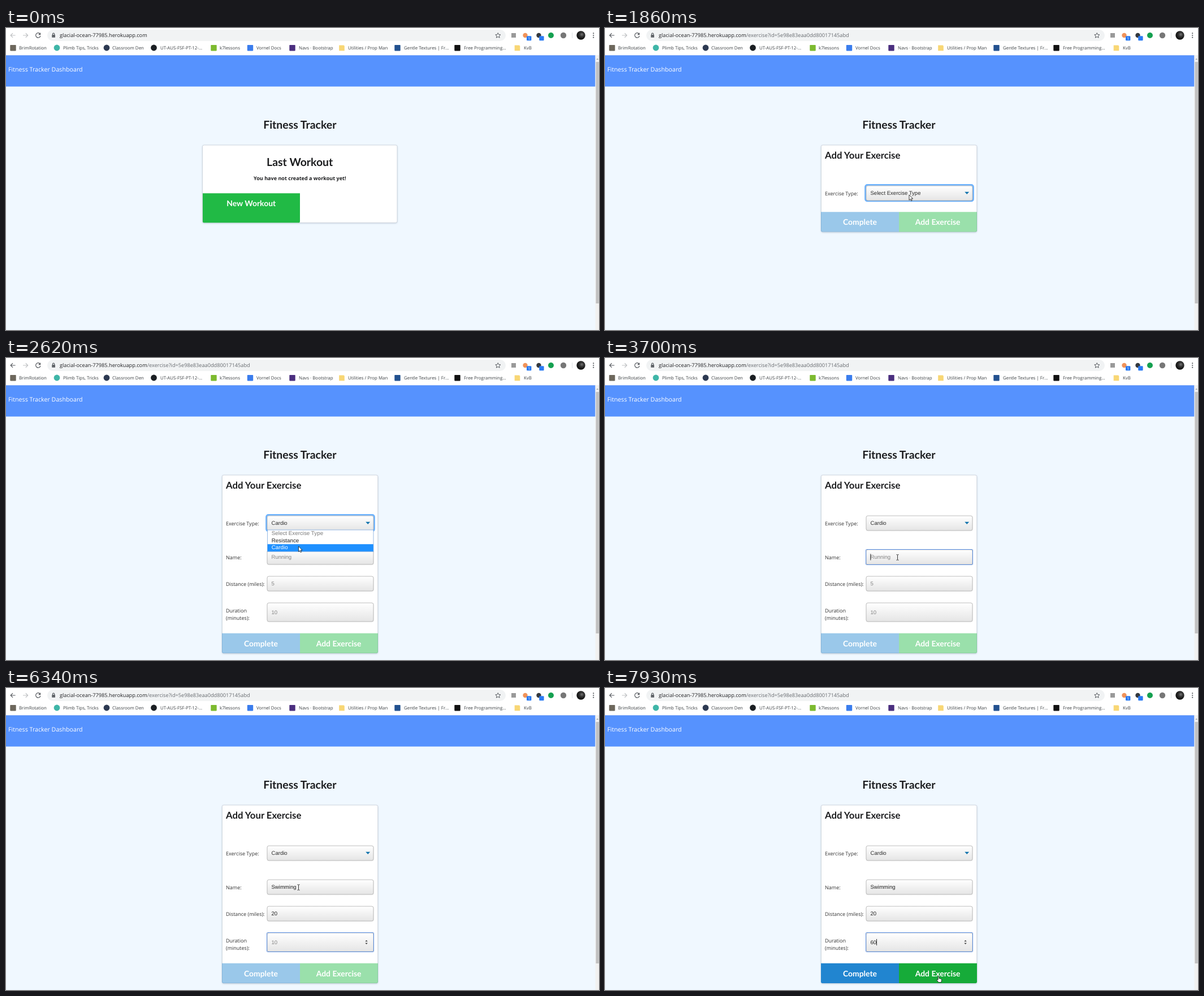
Recreate the animation shown at these times as an HTML page. Size 1049x534 px, loop 8000 ms.

```html
<!DOCTYPE html>
<html lang="en">
<head>
<meta charset="utf-8">
<title>Fitness Tracker</title>
<style>
html, body { margin: 0; width: 100%; height: 100%; overflow: hidden; background: #fff; }
svg { display: block; width: 100vw; height: 100vh; }
text { font-family: "Open Sans", "Noto Sans", sans-serif; white-space: pre; text-rendering: geometricPrecision; }
.head { font-family: Lato, sans-serif; font-weight: 700; }
.mid { text-anchor: middle; }
.field { font-family: "Liberation Sans", Arial, sans-serif; font-size: 9.56px; fill: #2c2c2c; }
.icon { fill: none; stroke: #55595e; stroke-width: 1.2; }
</style>
</head>
<body>
<svg id="stage" viewBox="0 0 1049 534" xmlns="http://www.w3.org/2000/svg"></svg>
<script>
const LOOP = 8000, BLINK = 530;
const OPEN_AT = 2560, PAGE_AT = 1120, CLICK_AT = 960, READY_AT = 6600;

// [time, x, y] of the pointer tip
const pointer = [
  [0, 990, 560], [130, 985, 545], [200, 950, 518], [320, 850, 458], [440, 715, 392], [560, 590, 336],
  [680, 498, 303], [780, 456, 296], [920, 443.5, 305.5],
  [1150, 443.5, 305.5], [1260, 468, 302], [1400, 516, 297], [1570, 538, 295],
  [1900, 538, 295], [2000, 534, 302], [2160, 523, 322], [2330, 517.5, 333],
  [2640, 517.5, 333], [2760, 517, 327],
  [2940, 517, 327], [3010, 517.5, 352.5],
  [7180, 517.5, 352.5], [7280, 522, 370], [7400, 538, 410], [7520, 562, 463],
  [7640, 586, 506], [7740, 596, 519], [7930, 590, 509.5]
];

const fields = [
  { id: 'name', y: 339, h: 26, hint: 'Running', focus: [3200, 5050], keys: [
    [3830, 'S'], [4030, 'Sw'], [4160, 'Swi'], [4320, 'Swim'], [4450, 'Swimm'],
    [4620, 'Swimmi'], [4700, 'Swimmin'], [4785, 'Swimming']] },
  { id: 'distance', y: 386, h: 26, hint: '5', spin: true, focus: [5050, 5810], keys: [[5480, '2'], [5580, '20']] },
  { id: 'duration', y: 433, h: 33, hint: '10', spin: true, focus: [5810, LOOP], keys: [[6600, '6'], [6725, '60']] }
];

const text = (x, y, size, str, extra = '') =>
  `<text x="${x}" y="${y}" font-size="${size}" ${extra}>${str}</text>`;
const head = (x, y, size, str, fill = '#1c1d1f') => text(x, y, size, str, `class="head mid" fill="${fill}"`);
const rect = (x, y, w, h, fill, extra = '') =>
  `<rect x="${x}" y="${y}" width="${w}" height="${h}" fill="${fill}" ${extra}/>`;
const dot = (x, y, r, fill) => `<circle cx="${x}" cy="${y}" r="${r}" fill="${fill}"/>`;
const path = (d, extra = '') => `<path d="${d}" ${extra}/>`;
const group = (id, body) => `<g id="${id}">${body}</g>`;

const card = (id, x, y, w, h) =>
  rect(x, y + 1, w, h, '#8fa0b4', `class="${id}" rx="3" filter="url(#soft)" opacity=".55"`) +
  rect(x, y, w, h, '#fff', `class="${id}" rx="2.8" stroke="#ccd3dc" stroke-width=".9"`);
const box = (y, h) =>
  rect(461.4, y + .2, 189.6, h + 1, '#000', 'rx="3.5" opacity=".05"') +
  rect(462, y, 188, h, 'url(#shade)', 'rx="3" stroke="#adadad" stroke-width=".8"');

// Bookmarks: [icon kind, icon colour, icon x, label x, label]
const bookmarks = [
  ['sq', '#6d675c', 12.5, 23, 'BrimRotation'], ['dot', '#3fb6a8', 90, 101, 'Plimb Tips, Tricks'],
  ['dot', '#2d3a52', 178, 188, 'Classroom Den'], ['dot', '#1b1f23', 261.5, 273, 'UT-AUS-FSF-PT-12-...'],
  ['sq', '#7dba2f', 367.5, 378, 'k7lessons'], ['sq', '#3b7ded', 432, 443, 'Vornel Docs'],
  ['sq', '#4b2f7f', 506.5, 518, 'Navs · Bootstrap'], ['folder', '#f8d775', 594, 605, 'Utilities / Prop Man'],
  ['sq', '#23518f', 692.5, 704, 'Gentle Textures | Fr...'], ['sq', '#111', 798.5, 810, 'Free Programming...'],
  ['folder', '#f8d775', 904.5, 916, 'KvB']
];
const bookmark = ([kind, fill, x, tx, label]) => (
  kind === 'dot' ? dot(x, 35, 5.4, fill) :
  kind === 'sq' ? rect(x - 5.2, 30, 10.4, 10.4, fill, 'rx=".8"') :
  path(`M${x - 4.8} 30.4h8.2l1.4 1.4v8.4h-9.6z`, `fill="${fill}"`)
) + text(tx, 37.9, 7.9, label, 'fill="#3c4043"');

const toolbar =
  rect(0, 0, 1049, 48, '#fff') + rect(73, 3, 811, 20, '#f1f3f4', 'rx="10"') +
  path('M16.6 13H8.4M12 9.2 8.2 13l3.8 3.8', 'class="icon" id="back"') +
  path('M30 13h8.4M34.8 9.2 38.6 13l-3.8 3.8', 'class="icon" style="stroke:#bdbfc2"') +
  group('reload', path('M60.2 10.4A4.2 4.2 0 1 0 60.9 14', 'class="icon"') + path('M61.2 8v4.2H57z', 'fill="#55595e"')) +
  path('M52.8 9.2l7.6 7.6M60.4 9.2l-7.6 7.6', 'class="icon" id="stop"') +
  rect(81.2, 12, 5.8, 4.8, '#5f6368', 'rx=".6"') + path('M82.5 12v-1.3a1.6 1.6 0 0 1 3.2 0V12', 'class="icon" stroke-width=".9"') +
  text(95, 16.3, 9.2, 'glacial-ocean-77985.herokuapp.com<tspan id="url" fill="#666a6f"></tspan>', 'fill="#202124"') +
  path('M870.3 8.6l1.35 2.95 3.2.35-2.4 2.15.7 3.15-2.85-1.65-2.85 1.65.7-3.15-2.4-2.15 3.2-.35z', 'class="icon" style="stroke-width:1"') +
  rect(894, 9, 8, 8, '#9a9a9a') + dot(918.5, 13, 4.2, '#f0935a') + dot(942.5, 13, 4.2, '#33383d') +
  rect(921, 14.3, 8.4, 8, '#2b7bf3', 'rx="1.2"') + text(925.2, 20.8, 6.5, '1', 'class="mid" fill="#fff"') +
  rect(943.2, 14.3, 8.4, 8, '#2b7bf3', 'rx="1.2"') +
  dot(964, 13, 5, '#14a050') + dot(986, 13, 5.2, '#777') +
  rect(1001.3, 8, .8, 10, '#d5d8dc') + dot(1017, 13, 7.7, 'url(#avatar)') +
  [9.3, 13, 16.7].map(y => dot(1039.2, y, 1.1, '#55595e')).join('') +
  bookmarks.map(bookmark).join('');

const page =
  rect(0, 48, 1049, 486, '#f0f8ff') + rect(0, 48, 1042.5, 55.5, '#5692fe') + rect(0, 47.6, 1049, .7, '#d4dbe6') +
  text(4, 77.2, 10.7, 'Fitness Tracker Dashboard', 'fill="#fff"') +
  rect(1042.5, 48, 6.5, 486, '#f1f1f1') + rect(1043.5, 60, 5.2, 427, '#c1c1c1') +
  path('M1044.3 56l1.9-2.3 1.9 2.3z', 'fill="#a0a0a0"') +
  head(519.8, 178.2, 19.45, 'Fitness Tracker');

const home = group('home',
  card('last', 347.6, 207, 344.4, 137.3) +
  head(519.7, 243.7, 19.45, 'Last Workout') +
  text(519.8, 268.6, 9.05, 'You have not created a workout yet!', 'class="mid" font-weight="700" fill="#1c1d1f"') +
  path('M348 292.3h172v49.4a2.6 2.6 0 0 1-2.6 2.6H350.6a2.6 2.6 0 0 1-2.6-2.6z', 'id="start"') +
  head(433.7, 314.9, 13.9, 'New Workout', '#fff'));

const label = (y, str) => text(389, y, 9, str, 'fill="#333"');
const fieldMarkup = f => {
  const mid = f.y + f.h / 2;
  return box(f.y, f.h) +
    `<text id="${f.id}" class="field" x="469.5" y="${mid + 3.4}"></text>` +
    group(f.id + 'Focus',
      rect(461.5, f.y - .5, 189, f.h + 1, 'none', 'rx="1" stroke="#5b90e4"') +
      (f.spin ? path(`M635.4 ${mid - 1.2}l2.2-2.5 2.2 2.5zM635.4 ${mid + 1.2}l2.2 2.5 2.2-2.5z`, 'fill="#444"') : '')) +
    rect(0, mid - 5.6, .9, 11.2, '#111', `id="${f.id}Caret"`);
};

const rows = ['Select Exercise Type', 'Resistance', 'Cardio'];
const popup = group('popup',
  rect(462.4, 304, 187.6, 38.4, '#fff', 'stroke="#7fa9dd" stroke-width=".8"') +
  rect(462.6, 0, 187.2, 12.7, '#1e90ff', 'id="mark"') +
  rows.map((s, i) => `<text id="row${i}" class="field" style="font-size:9.8px" x="469.8" y="${313.2 + i * 12.6}">${s}</text>`).join(''));

const form = group('form',
  card('sheet', 382.4, 207, 275.4, 153.4) +
  text(389, 230.7, 16.75, 'Add Your Exercise', 'class="head" fill="#1c1d1f"') +
  label(295.6, 'Exercise Type:') +
  rect(460.5, 277.4, 191, 28.6, 'none', 'id="ring" rx="3.6" stroke="#3b99fc" stroke-opacity=".75" stroke-width="2.7" filter="url(#glow)"') +
  box(279, 26) + '<text id="choice" class="field" x="469.5" y="295.2"></text>' +
  path('M636.2 289.8h8l-4 4.3z', 'fill="#1273ad"') +
  group('details',
    label(356, 'Name:') + label(402.7, 'Distance (miles):') + label(449.8, 'Duration') + label(462.8, '(minutes):') +
    fields.map(fieldMarkup).join('')) +
  group('actions',
    path('M382 325.3H520v35.1H384.6a2.6 2.6 0 0 1-2.6-2.6z', 'id="complete"') +
    path('M520 325.3h138v32.5a2.6 2.6 0 0 1-2.6 2.6H520z', 'id="add"') +
    head(451, 348.2, 13.9, 'Complete', '#fff') + head(588.6, 348.2, 13.9, 'Add Exercise', '#fff')) +
  popup);

const outlined = 'fill="#fff" stroke="#111" stroke-width=".8" stroke-linejoin="round"';
const cursors = group('pointer',
  path('M0 0V9.4L2.2 7.4 3.7 10.7 5.2 10 3.8 6.8H6.7Z', `id="arrow" ${outlined}`) +
  path('M-.9.7C-.9-.4.9-.4.9.7V4L4.4 4.7Q5.7 5.1 5.5 6.6L4.8 11H.2L-3 7.2Q-3.5 5.6-2 5.9L-.9 6.8Z', `id="hand" ${outlined}`) +
  path('M-2-4.8H-.5L0-4.3.5-4.8H2M0-4.3V4.3M-2 4.8H-.5L0 4.3.5 4.8H2', 'id="beam" fill="none" stroke="#222" stroke-width=".9"'));

document.getElementById('stage').innerHTML = `<defs>
  <linearGradient id="shade" x2="0" y2="1"><stop stop-color="#fff"/><stop offset="1" stop-color="#e5e5e5"/></linearGradient>
  <radialGradient id="avatar" cx=".6" cy=".4"><stop stop-color="#777"/><stop offset=".5" stop-color="#333"/><stop offset="1" stop-color="#151515"/></radialGradient>
  <filter id="soft" x="-5%" y="-10%" width="110%" height="120%"><feGaussianBlur stdDeviation="1.5"/></filter>
  <filter id="glow" x="-5%" y="-30%" width="110%" height="160%"><feGaussianBlur stdDeviation=".4"/></filter>
</defs>` + page + home + form +
  group('status', rect(-4, 529.6, 353, 12, '#fff', 'rx="2.5" stroke="#d3d8de" stroke-width=".8"')) +
  toolbar + cursors;

const el = id => document.getElementById(id);
const show = (id, on) => { el(id).style.display = on ? '' : 'none'; };
const set = (id, attr, value) => el(id).setAttribute(attr, value);
const ramp = (t, from, to) => Math.min(1, Math.max(0, (t - from) / (to - from)));
const pen = document.createElement('canvas').getContext('2d');
pen.font = '9.56px "Liberation Sans", Arial, sans-serif';
pen.textRendering = 'geometricPrecision';

function pointerAt(t) {
  const i = pointer.findIndex(p => p[0] > t);
  if (i < 0) return pointer[pointer.length - 1].slice(1);
  const [t0, x0, y0] = pointer[i - 1], [t1, x1, y1] = pointer[i];
  const k = (t - t0) / (t1 - t0);
  return [x0 + (x1 - x0) * k, y0 + (y1 - y0) * k];
}

function drawField(f, t) {
  const typed = f.keys.filter(k => k[0] <= t).pop();
  const value = typed ? typed[1] : '';
  const focused = t >= f.focus[0] && t < f.focus[1];
  const since = Math.max(f.focus[0], typed ? typed[0] : 0);
  el(f.id).textContent = value || f.hint;
  el(f.id).style.fill = value ? '#222' : '#858585';
  show(f.id + 'Focus', focused);
  show(f.id + 'Caret', focused && Math.floor((t - since) / BLINK) % 2 === 0);
  set(f.id + 'Caret', 'x', 469.4 + pen.measureText(value).width);
}

function draw(t) {
  const onForm = t >= PAGE_AT, open = t >= OPEN_AT, listed = t >= 1900 && t < 2760;
  const [x, y] = pointerAt(t);

  // Browser chrome
  const loading = t >= CLICK_AT && t < 1300;
  el('back').style.stroke = t >= CLICK_AT ? '' : '#bdbfc2';
  show('reload', !loading);
  show('stop', loading);
  show('status', t >= CLICK_AT && t < PAGE_AT);
  el('url').textContent = t < CLICK_AT ? '' : '/exercise' + (t < 1300 ? '' : '?id=5e98e83eaa0dd80017145abd');

  // Pages
  show('home', !onForm);
  show('form', onForm);
  const overStart = !onForm && x > 348 && x < 520 && y > 292 && y < 344;
  set('start', 'fill', t >= CLICK_AT ? '#0ea432' : overStart ? '#16ab39' : '#21ba45');

  document.querySelectorAll('.sheet').forEach(s => s.setAttribute('height', open ? 314.9 : 153.4));
  show('details', open);
  show('ring', t >= 1830 && t < 3200);
  el('choice').textContent = rows[open ? 2 : 0];
  fields.forEach(f => drawField(f, t));

  // Option list
  const row = y >= 329 || open ? 2 : y >= 317 ? 1 : 0;
  show('popup', listed);
  set('popup', 'opacity', 1 - ramp(t, 2650, 2760));
  show('mark', listed && row > 0);
  set('mark', 'y', 304 + row * 12.6);
  rows.forEach((_, i) => { el('row' + i).style.fill = i === 0 ? '#7b7b7b' : i === row ? '#fff' : '#222'; });

  // Buttons
  const overActions = open && y >= 487;
  const strength = .45 + .55 * ramp(t, READY_AT, READY_AT + 100);
  set('actions', 'transform', `translate(0 ${open ? 161.5 : 0})`);
  set('complete', 'fill', '#2185d0');
  set('add', 'fill', overActions ? '#16ab39' : '#21ba45');
  ['complete', 'add'].forEach(id => set(id, 'fill-opacity', strength));

  // Pointer
  const overField = open && t > 2950 && fields.some(f => y >= f.y && y <= f.y + f.h);
  const kind = overStart || overActions ? 'hand' : overField ? 'beam' : 'arrow';
  ['arrow', 'hand', 'beam'].forEach(id => show(id, id === kind));
  set('pointer', 'transform', `translate(${x} ${y})`);
}

const began = performance.now();
function tick() {
  draw((performance.now() - began) % LOOP);
  requestAnimationFrame(tick);
}
tick();
</script>
</body>
</html>
```
